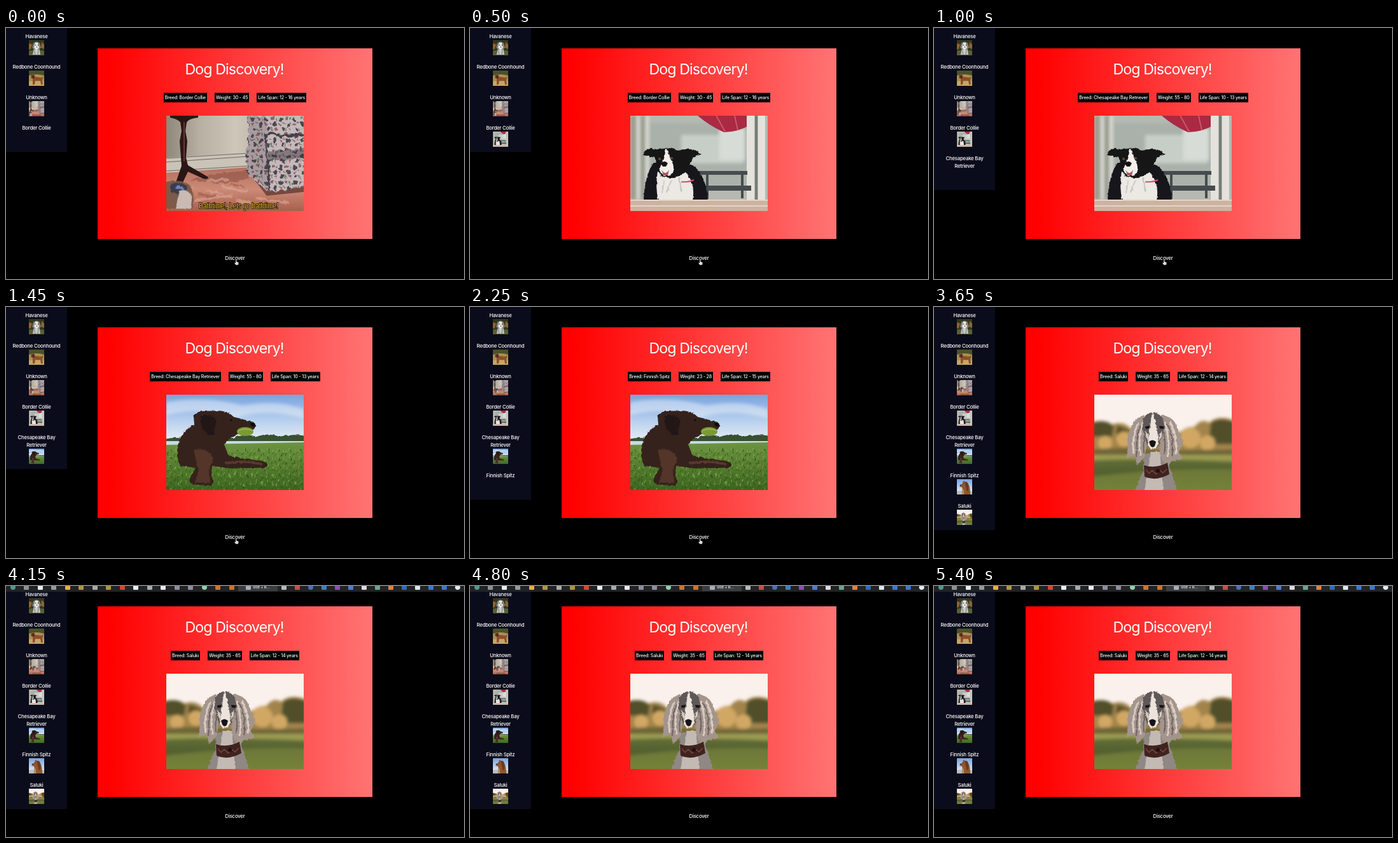
Recreate the animation shown at these times as an HTML page. Size 720 by 395 pixels, loop 5450 ms.

```html
<!DOCTYPE html>
<html lang="en">
<head>
<meta charset="utf-8">
<title>Dog Discovery</title>
<style>
html, body { margin: 0; width: 100%; height: 100%; overflow: hidden; background: #000; }
#stage {
  position: relative; width: 720px; height: 395px; overflow: hidden; background: #000;
  color: #fff; font: 500 7.75px/12px Inter, Roboto, sans-serif; letter-spacing: -.2px; text-align: center;
  --loop: 5450ms;
}
#stage > * { position: absolute; }
svg { display: block; }
.defs { position: absolute; width: 0; height: 0; }

#side {
  left: 0; top: 0; width: 96px; height: 195px; overflow: hidden; background: #0b0c1b;
  animation: grow var(--loop) step-end infinite;
}
.item { margin-bottom: 12px; padding: 0 8px; }
.item:first-child { margin-top: 7px; }
.item svg { width: 24px; height: 24px; margin: 0 auto; }

#card { left: 144px; top: 32px; width: 432px; height: 300px; background: linear-gradient(90deg, #f00 4%, #ff7474); }
h1 {
  left: 143px; top: 50px; width: 432px; margin: 0;
  font-size: 23.2px; font-weight: 400; line-height: 30px; letter-spacing: -.88px;
}
#info { left: 144px; top: 102px; width: 432px; height: 15px; overflow: hidden; }
#info div { animation: info var(--loop) step-end infinite; }
#info p { display: flex; justify-content: center; gap: 12px; height: 15px; margin: 0; font-size: 7.08px; line-height: 15px; letter-spacing: -.17px; }
#info span { padding: 0 2px; background: #000; white-space: nowrap; }
#photo { left: 252px; top: 138px; width: 216px; height: 150px; overflow: hidden; }
#photo div { animation: photo var(--loop) step-end infinite; }
#photo svg { width: 216px; height: 150px; }

#discover { left: 310px; top: 356px; width: 100px; }
#hand { left: 358px; top: 364px; animation: leave var(--loop) step-end infinite; }

#tabs { left: 0; top: 0; width: 720px; height: 8.5px; background: #222325; animation: drop var(--loop) linear infinite; }
#tabs i { position: absolute; top: -2px; width: 8px; height: 8px; border-radius: 1.5px; }
#tabs i.round { border-radius: 50%; }
#tabs b {
  position: absolute; left: 365px; top: -4px; width: 62px; height: 12px; background: #3b3d40;
  font-size: 5.8px; font-weight: 500; letter-spacing: 0; text-align: left; text-indent: 23px;
}

.load1 { animation: load1 var(--loop) step-end infinite; }
.load2 { animation: load2 var(--loop) step-end infinite; }
.load3 { animation: load3 var(--loop) step-end infinite; }
.load4 { animation: load4 var(--loop) step-end infinite; }
.pup { animation: run calc(var(--loop) / 3) linear infinite; }

@keyframes grow { 0% { height: 195px } 18.35% { height: 255px } 38.53% { height: 303px } 55.05% { height: 351px } }
@keyframes info {
  0% { transform: none } 18.35% { transform: translateY(-15px) }
  38.53% { transform: translateY(-30px) } 55.05% { transform: translateY(-45px) }
}
@keyframes photo {
  0% { transform: none } 4.59% { transform: translateY(-150px) } 22.94% { transform: translateY(-300px) }
  44.04% { transform: translateY(-450px) } 59.63% { transform: translateY(-600px) }
}
@keyframes load1 { 0% { opacity: 0 } 4.59% { opacity: 1 } }
@keyframes load2 { 0% { opacity: 0 } 22.94% { opacity: 1 } }
@keyframes load3 { 0% { opacity: 0 } 44.04% { opacity: 1 } }
@keyframes load4 { 0% { opacity: 0 } 59.63% { opacity: 1 } }
@keyframes leave { 0% { opacity: 1 } 58.72% { opacity: 0 } }
@keyframes drop { 0%, 69.3% { transform: translateY(-9px) } 72.9%, 100% { transform: none } }
@keyframes run {
  0% { transform: none } 14% { transform: translate(26px, -14px) } 30% { transform: translate(66px, -38px) }
  60% { transform: translate(80px, -30px) } 80%, 100% { transform: translate(-45px, 10px) }
}
</style>
</head>
<body>
<svg class="defs">
  <defs>
    <linearGradient id="sky" x2="0" y2="1"><stop stop-color="#78a3df"/><stop offset=".55" stop-color="#bcd3ee"/><stop offset="1" stop-color="#f2f4f6"/></linearGradient>
    <linearGradient id="lawn" x2="0" y2="1"><stop stop-color="#6d9440"/><stop offset="1" stop-color="#3c651f"/></linearGradient>
    <linearGradient id="field" x2="0" y2="1"><stop stop-color="#a3a356"/><stop offset=".4" stop-color="#6d7838"/><stop offset="1" stop-color="#76863a"/></linearGradient>
    <linearGradient id="wall"><stop stop-color="#8f877a"/><stop offset=".25" stop-color="#b8b0a2"/><stop offset=".5" stop-color="#cdc6b9"/><stop offset="1" stop-color="#aca291"/></linearGradient>
    <linearGradient id="rug" x2="0" y2="1"><stop stop-color="#b5705f"/><stop offset=".5" stop-color="#cc8a76"/><stop offset="1" stop-color="#a8604d"/></linearGradient>
    <filter id="soft" x="-10%" y="-10%" width="120%" height="120%"><feGaussianBlur stdDeviation="2.5"/></filter>
    <filter id="rough">
      <feTurbulence type="fractalNoise" baseFrequency=".12" numOctaves="2" seed="4"/>
      <feDisplacementMap in="SourceGraphic" scale="9" xChannelSelector="R" yChannelSelector="G"/>
    </filter>
    <filter id="fur">
      <feTurbulence type="fractalNoise" baseFrequency=".2" numOctaves="2" seed="2"/>
      <feDisplacementMap in="SourceGraphic" scale="4" xChannelSelector="R" yChannelSelector="G"/>
    </filter>
    <pattern id="floral" width="22" height="25" patternUnits="userSpaceOnUse">
      <rect width="22" height="25" fill="#c4babb"/>
      <path d="M2 3l5 2-2 5-4-2zM13 12l6-2 1 6-5 2zM5 18l5 1-2 5-4-1z" fill="#4f4650"/>
      <path d="M11 1l5 1-2 5-4-2zM0 12l6 1-2 4zM15 20l5-1-1 5z" fill="#94606b"/>
      <path d="M8 10l3 3M18 4l2 4M11 18l2 6" stroke="#77806d" stroke-width="2"/>
    </pattern>
    <pattern id="blades" width="17" height="13" patternUnits="userSpaceOnUse">
      <path d="M1 5l2-5M9 13l-2-6M12 5l3-4" stroke="#2f5418"/><path d="M5 9l2-5M14 12l1-5M3 13l-1-3" stroke="#7fa648"/>
    </pattern>

    <symbol id="bath" viewBox="0 0 216 150" preserveAspectRatio="none">
      <rect width="216" height="150" fill="url(#wall)"/>
      <path d="M0 66L130 58V82L0 90z" fill="#c9c3b8"/>
      <path d="M0 67L130 59M0 73L130 64M0 87L130 79" stroke="#6f6861" stroke-width="1.2"/>
      <path d="M0 90L130 81 216 90V150H0z" fill="url(#rug)"/>
      <g filter="url(#rough)">
        <path d="M36 101l40-9 50-6 5 12-45 9z" fill="#8d5247" opacity=".6"/>
        <path d="M16 110l25 4M64 103l34-3M86 112l40 8M45 133l60-8M140 130l54 8M60 118l30 4M110 132l24 6" stroke="#dda896" stroke-width="4" opacity=".6"/>
        <path d="M50 124l30 3M100 108l22 4M120 140l50 4M66 142l40-2" stroke="#94503f" stroke-width="3" opacity=".5"/>
      </g>
      <path d="M6 0H50V3Q34 5 32 11L30 24 33 40 31 66 34 78 65 96Q68 101 58 99L34 88 26 105H15L24 79 21 40 24 24 22 10Q17 5 6 3z" fill="#2b1616"/>
      <path d="M28 10V72" stroke="#643a33" stroke-width="2"/>
      <path d="M125 84L158 119 216 112V120L158 126z" fill="#53302c" opacity=".7"/>
      <g filter="url(#rough)">
        <path d="M127 0H220V112L160 120 128 91Q122 60 130 30z" fill="url(#floral)"/>
        <path d="M127 0H158L157 62 163 118 128 91Q122 60 130 30z" fill="#40343e" opacity=".22"/>
        <path d="M160 56L220 50V66L161 72z" fill="#332a33" opacity=".45"/>
        <path d="M156 28Q157 62 163 118M158 26Q185 36 220 29" fill="none" stroke="#453c46" stroke-width="3"/>
      </g>
      <g class="pup" filter="url(#fur)">
        <path d="M-20 112Q10 100 29 112 40 130 34 150H-20z" fill="#7d5a49"/>
        <path d="M0 111Q16 106 27 115L22 130 0 123z" fill="#3a3a50"/>
        <path d="M13 122Q28 116 33 133L32 150H8z" fill="#c9bbb3"/>
        <path d="M8 117Q15 114 20 120" fill="none" stroke="#6d87b8" stroke-width="4"/>
      </g>
      <text transform="translate(113.5 146) scale(1 1.35)" text-anchor="middle" font-family="Liberation Sans, sans-serif" font-size="10" font-weight="400" letter-spacing="0" fill="#e3b52a" stroke="#241b0d" stroke-width="1.4" paint-order="stroke">Bathtime!, Lets go bathtime!</text>
    </symbol>

    <symbol id="collie" viewBox="0 0 216 150" preserveAspectRatio="none">
      <rect width="216" height="150" fill="#b5b9b2"/>
      <g filter="url(#soft)">
        <path d="M0 0H24V132H0z" fill="#9b9d90"/><path d="M10 0H15V132H10zM24 0H29V132H24z" fill="#dedfd9"/>
        <path d="M29 12H184V110H29z" fill="#a9b1aa"/><path d="M80 30H178V75H80z" fill="#c7cdc7"/>
        <path d="M140 20H180V70H140z" fill="#d8dcd6"/>
      </g>
      <path d="M106 0H192L189 14Q170 26 147 26 123 15 106 0z" fill="#a92a42"/>
      <path d="M135 0L149 25M164 0L169 23" stroke="#cf566a" stroke-width="2"/>
      <path d="M183 0H195V132H183zM201 0H212V132H201z" fill="#e3e2dc"/><path d="M196 0H200V132H196z" fill="#777c76"/>
      <path d="M108 87H184V93H108zM116 110H190V118H116zM119 88H123V130H119zM174 88H178V130H174z" fill="#464c4e"/>
      <g filter="url(#fur)">
        <path d="M37 73Q22 95 21 134H122Q119 92 98 78z" fill="#17181b"/>
        <path d="M43 88Q39 112 44 134H98Q103 105 86 88L65 98z" fill="#ece8e3"/>
        <path d="M65 101l-8 20M76 98l5 22M53 102l-3 20" stroke="#c8c4c1" stroke-width="2"/>
        <path d="M24 55Q31 49 43 54 57 47 75 55 99 48 111 61L98 66 88 88Q68 104 47 94L39 66 20 62z" fill="#151619"/>
        <path d="M57 52Q61 66 65 71 72 87 63 94 49 98 46 85L50 73Q56 65 54 52z" fill="#f3eeea"/>
      </g>
      <path d="M48 75Q54 69 59 75L56 80H51z" fill="#111"/><path d="M49 85Q55 95 61 85L59 94H52z" fill="#a75b61"/>
      <circle cx="46" cy="68" r="2" fill="#6a4836"/><circle cx="65" cy="67" r="2" fill="#6a4836"/>
      <path d="M80 104Q92 105 100 101" fill="none" stroke="#d54e6a" stroke-width="2"/>
      <path d="M0 132H216V150H0z" fill="#cbb3a3"/><path d="M0 133H216M0 142H216" stroke="#e4d4c6" stroke-width="2"/>
    </symbol>

    <symbol id="bay" viewBox="0 0 216 150" preserveAspectRatio="none">
      <rect width="216" height="80" fill="url(#sky)"/>
      <path d="M0 12Q60 1 120 17 175 7 216 23V37Q155 20 108 37 55 18 0 32z" fill="#fff" opacity=".4" filter="url(#soft)"/>
      <g filter="url(#fur)"><path d="M-4 71Q12 65 28 70L105 68Q125 60 142 66 160 59 178 66 198 61 220 65V77H-4z" fill="#385130"/></g>
      <rect y="73" width="216" height="7" fill="#c9d9e2"/>
      <path d="M0 79L216 75V150H0z" fill="url(#lawn)"/>
      <g filter="url(#rough)"><path d="M-6 84H222V156H-6z" fill="url(#blades)"/></g>
      <g filter="url(#fur)">
        <path d="M18 80Q25 54 44 47L43 34Q47 25 60 26L82 25Q98 26 106 35L137 43Q143 48 138 54L110 63Q97 69 91 78L98 97 150 104Q163 108 157 115L100 116 72 112 71 128Q78 137 70 143L42 142Q33 136 41 125L46 115 22 112Q15 97 18 80z" fill="#35221b"/>
        <path d="M54 34Q71 28 79 40L74 64Q61 64 55 51z" fill="#231713"/>
        <path d="M43 87Q61 80 74 100L66 123 70 139 44 138 51 121z" fill="#523629"/>
        <path d="M92 108Q124 102 151 110" fill="none" stroke="#553a2e" stroke-width="4"/>
      </g>
      <circle cx="102" cy="40" r="1.5" fill="#0d0a09"/><path d="M132 43l8 3-1 5-6-2z" fill="#0e0a09"/>
      <ellipse cx="124" cy="58" rx="13" ry="7" fill="#7c9a34"/><path d="M113 57Q124 51 136 57" fill="none" stroke="#b3c660"/>
    </symbol>

    <symbol id="spitz" viewBox="0 0 216 150" preserveAspectRatio="none">
      <rect width="216" height="150" fill="url(#sky)"/><path d="M0 117Q70 106 216 118V150H0z" fill="#b8bdb7"/>
      <g filter="url(#fur)">
        <path d="M70 156Q80 110 75 82L43 73Q33 63 45 56L76 46 90 18Q105 9 113 26 151 20 165 52 188 78 190 156z" fill="#8c5733"/>
        <path d="M111 26Q149 20 160 59L163 110Q150 127 135 105L122 62z" fill="#653a24"/>
        <path d="M80 91Q107 107 100 156H72z" fill="#c08d5d"/>
      </g>
      <path d="M44 56l12-3 2 9-11 4z" fill="#251812"/><circle cx="84" cy="48" r="4" fill="#251812"/>
    </symbol>

    <symbol id="saluki" viewBox="0 0 216 150" preserveAspectRatio="none">
      <rect width="216" height="150" fill="#fbf1ec"/>
      <g filter="url(#soft)">
        <path d="M-9 45Q13 37 28 47 46 40 58 54 80 47 110 57L135 59Q146 49 157 51 168 36 181 44 194 30 225 42V107H-9z" fill="#a2844c"/>
        <path d="M-9 46Q18 36 31 50L28 66H-9zM183 45Q198 32 225 46V78H180zM36 48L56 56 50 68 34 62z" fill="#51502c"/>
        <g fill="#d2a763"><circle cx="47" cy="70" r="12"/><circle cx="151" cy="68" r="16"/><circle cx="178" cy="76" r="12"/><circle cx="17" cy="76" r="11"/></g>
        <path d="M-9 87Q50 80 104 88L225 86V101H-9z" fill="#6f6538"/>
        <path d="M-9 95H225V160H-9z" fill="url(#field)"/>
        <path d="M-9 104Q75 98 225 106V118Q100 115 -9 130z" fill="#42522b" opacity=".6"/>
      </g>
      <g filter="url(#fur)">
        <path d="M78 93L110 91 119 116 132 156H62L77 118z" fill="#8f8884"/><path d="M89 90H103L109 156H78z" fill="#c3bab4"/>
        <path d="M78 32Q62 36 58 51 49 70 53 88L50 100 64 96 67 110 80 97 85 43zM105 32Q125 34 130 51L140 75 133 90 139 101 121 105 113 113 102 91z" fill="#a3958c"/>
        <path d="M70 43Q58 66 62 93M76 43Q68 71 73 96M119 43Q131 67 128 94M111 43Q119 70 116 98" fill="none" stroke="#d9cdc3" stroke-width="3"/>
        <path d="M73 48Q65 66 67 98M81 52Q76 76 78 92M115 46Q126 70 122 97M108 54Q113 76 110 94" fill="none" stroke="#6d6260" stroke-width="2"/>
        <path d="M77 38Q91 18 107 36L111 52 102 78Q92 92 84 81L76 55z" fill="#5f5958"/>
        <path d="M91 26Q97 43 99 57L101 77Q92 93 84 80L87 56z" fill="#ece3dc"/>
        <path d="M79 57l6 5 1 12-4-6zM108 57l-6 5-1 12 4-6z" fill="#d3c8c0"/>
      </g>
      <path d="M86 74Q91 69 97 74L95 81Q91 85 88 80z" fill="#151416"/>
      <path d="M80 50l7-1-1 4-5 1zM102 49l8 1-2 4-5-1z" fill="#16100e"/>
      <path d="M78 111Q96 117 115 107L118 125Q97 137 79 129z" fill="#402320"/>
      <path d="M81 118l5 6 5-5 6 6 6-6 5 4 6-6" fill="none" stroke="#75493d" stroke-width="1.5"/>
      <circle cx="100" cy="120" r="3" fill="#1e1110"/>
    </symbol>

    <symbol id="havanese" viewBox="0 0 24 24" preserveAspectRatio="none">
      <rect width="24" height="24" fill="#30371f"/><path d="M0 17Q11 14 24 17V24H0z" fill="#55613a"/>
      <path d="M0 5l5 2-2 7-3 1zM20 3l4 4v7l-5-2z" fill="#8e6630"/>
      <path d="M8 12L16 11 18 23H6z" fill="#c9c7c6"/><path d="M7 5Q12 0 17 5L19 12 15 15H9L5 12z" fill="#85817f"/>
      <path d="M10 4h4l2 8-4 4-4-4z" fill="#e8e3df"/><path d="M10 8h1M14 8h1M12 11h1" stroke="#222" stroke-width="1.5"/>
      <path d="M8 15l2 8M15 15l-1 8" stroke="#777"/>
    </symbol>
    <symbol id="redbone" viewBox="0 0 24 24" preserveAspectRatio="none">
      <rect width="24" height="24" fill="#a8925a"/><path d="M0 0H24V8Q12 4 0 8z" fill="#4c5229"/><path d="M0 17H24V24H0z" fill="#c4a768"/>
      <path d="M3 8L8 6 10 10 20 11 23 9 21 15 22 22H19L18 16 10 16 9 22H6L6 13 3 12z" fill="#8f4e28"/><path d="M4 8l4-1 1 5-3 1z" fill="#542a1b"/>
    </symbol>
  </defs>
</svg>

<div id="stage">
  <div id="side"></div>
  <div id="card"></div>
  <h1>Dog Discovery!</h1>
  <div id="info"><div></div></div>
  <div id="photo"><div></div></div>
  <div id="discover">Discover</div>
  <svg id="hand" width="9" height="10" viewBox="0 0 9 10">
    <path d="M3 1Q4 .2 4.5 1V4L7 4.5Q8 4.8 7.7 6L7 9H3.4L1 6Q.8 5 2 5.4L3 6z" fill="#fff" stroke="#222" stroke-width=".5"/>
    <path d="M4.7 6v2M6 6v2" stroke="#555" stroke-width=".4"/>
  </svg>
  <div id="tabs"><b>Vite + R...</b></div>
</div>

<script>
const $ = id => document.getElementById(id);
const art = (id, cls = "") => `<svg class="${cls}"><use href="#${id}"/></svg>`;

const dogs = [
  ["Havanese", "havanese"], ["Redbone Coonhound", "redbone"], ["Unknown", "bath"],
  ["Border Collie", "collie", "load1"], ["Chesapeake Bay Retriever", "bay", "load2"],
  ["Finnish Spitz", "spitz", "load3"], ["Saluki", "saluki", "load4"]
];
$("side").innerHTML = dogs.map(([name, id, cls]) => `<div class="item">${name}${art(id, cls)}</div>`).join("");

const facts = [
  ["Border Collie", "30 - 45", "12 - 16"], ["Chesapeake Bay Retriever", "55 - 80", "10 - 13"],
  ["Finnish Spitz", "23 - 28", "12 - 15"], ["Saluki", "35 - 65", "12 - 14"]
];
$("info").firstChild.innerHTML = facts.map(([breed, weight, span]) =>
  `<p><span>Breed: ${breed}</span><span>Weight: ${weight}</span><span>Life Span: ${span} years</span></p>`).join("");

$("photo").firstChild.innerHTML = dogs.slice(2).map(([, id]) => art(id)).join("");

// Plain favicons: a trailing "o" marks a round one.
const left = "#4f9a8co #8a9299 #eee #999 #e8b04a #b4953c #aaa #b4953c #d8452f #eee #aaa #eee #8b8da0 #8b8da0 #8fd0b0o #c9742f #c9742f";
const right = "#bbb #c94f45 #4a6fc0o #3f7fc4 #8a4fb0 #4a7fd0 #ddd #6fa58c #d98545 #2a6fc0 #dfe6f0 #3c78d0 #3c78d0 #e8e8e8o";
const icons = (list, x, gap) => list.split(" ").map((c, i) =>
  `<i class="${c.endsWith("o") ? "round" : ""}" style="left:${x + i * gap - 4}px;background:${c.replace("o", "")}"></i>`).join("");
$("tabs").insertAdjacentHTML("beforeend",
  icons(left, 10.5, 21.5) + icons("#a9adb8", 381, 0) + icons(right, 436.5, 21));
</script>
</body>
</html>
```
